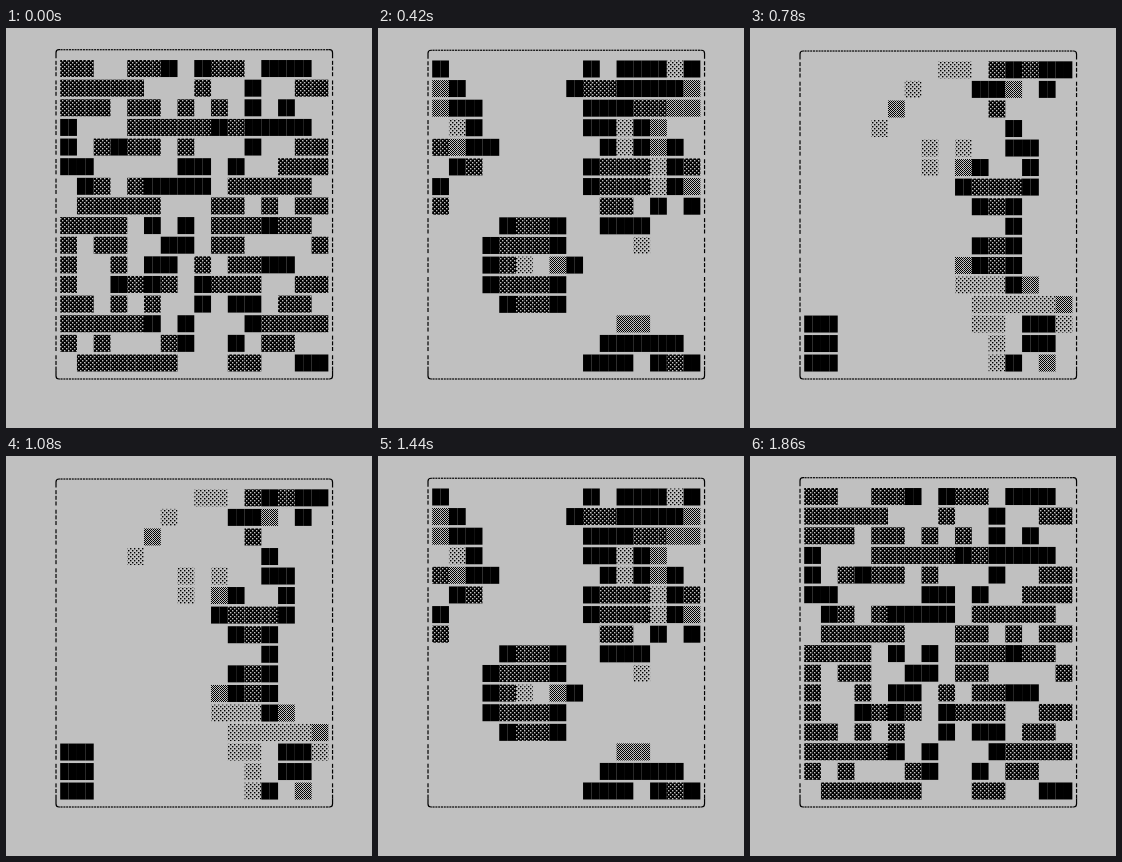
Write an HTML page with a canvas that moves like this. It is 366 px wide and 400 px high and loops after 1.89 s.

```html
<!DOCTYPE html>
<html lang="en">
<head>
<meta charset="utf-8">
<title>Game of Life with fading trails</title>
<style>
html, body { margin: 0; width: 100%; height: 100%; overflow: hidden; background: #c0c0c0; }
canvas { display: block; }
</style>
</head>
<body>
<canvas id="stage" width="366" height="400"></canvas>
<script>
const PAPER = '#c0c0c0', INK = '#000';
const N = 16, GENERATIONS = 32, STEP = 30;
const CHAR = 8.38, LEFT = 54.2, BLOCK = 17, FLOOR = 344.8, BOTTOM = 351;
const BAR_L = LEFT - CHAR / 2, BAR_R = LEFT + CHAR * (2 * N + 0.5);

// '#' is alive, '+' has just died
const SEED = [
  '++..+++#.#++.###'.replace('+++#.#', '++#.#'),
  '+++++...+..#..++',
  '+++.++.+.+.#.#..',
  '#...+++++#+####.',
  '#.+#++.+...#..++',
  '##.....##.#..+++',
  '.#+.+####.+++++.',
  '.+++++...++.+.++',
  '++++.#.#.+++#++.',
  '+.++..##.++....+',
  '+..+.##.+.++##..',
  '+..#+#+.#+++..++',
  '++.+.+..#.##.++.',
  '+++++#.#...#++++',
  '+.+...+#..#.++..',
  '.++++++...++..##'
];
SEED[0] = '++..++#.#++.###.';

const ctx = document.getElementById('stage').getContext('2d');

// A cell holds its age since death: 0 alive, 1 to 3 fading, 4 gone.
function evolve(grid) {
  const alive = (r, c) => grid[(r + N) % N][(c + N) % N] === 0;
  return grid.map((row, r) => row.map((age, c) => {
    let sum = 0;
    for (let dr = -1; dr < 2; dr++)
      for (let dc = -1; dc < 2; dc++) sum += alive(r + dr, c + dc);
    return sum === 3 || (sum === 4 && age === 0) ? 0 : Math.min(age + 1, 4);
  }));
}

const generations = [SEED.map(row => [...row].map(ch => ({ '#': 0, '+': 1 })[ch] ?? 4))];
while (generations.length < GENERATIONS) generations.push(evolve(generations.at(-1)));

// Shade made of staggered dots
function shade(back, front, size, period) {
  const tile = document.createElement('canvas');
  tile.width = tile.height = period;
  const g = tile.getContext('2d');
  g.fillStyle = back;
  g.fillRect(0, 0, period, period);
  g.fillStyle = front;
  g.fillRect(0, 0, size, size);
  g.fillRect(period / 2, period / 2, size, size);
  return ctx.createPattern(tile, 'repeat');
}
const FILLS = [INK, shade(INK, PAPER, 1.4, 4), shade(PAPER, INK, 1, 2), shade(PAPER, INK, 1.4, 4)];

// Lines holding block characters are taller than blank ones.
function lineHeight(row) {
  if (row.every(age => age > 3)) return 17;
  return row.includes(1) ? 19.63 : 19.5;
}

function drawRow(row, middle) {
  const top = middle - BLOCK / 2;
  row.forEach((age, c) => {
    if (age > 3) return;
    ctx.fillStyle = FILLS[age];
    for (let half = 0; half < 2; half++)
      ctx.fillRect(LEFT + (2 * c + half) * CHAR, top, CHAR, BLOCK);
  });
  ctx.fillStyle = INK;
  for (let i = 0; i < 3; i++)
    for (const x of [BAR_L, BAR_R])
      ctx.fillRect(x - 0.6, top + 0.8 + i * BLOCK / 3, 1.2, 4);
}

// Dashed edge with a rounded corner at each end; dir points into the box
function drawEdge(y, dir) {
  ctx.fillStyle = ctx.strokeStyle = INK;
  ctx.lineWidth = 1.2;
  for (let i = 0; i < 6 * N; i++)
    ctx.fillRect(LEFT + i * CHAR / 3 + 0.4, y - 0.6, 2, 1.2);
  for (const [x, side] of [[BAR_L, 1], [BAR_R, -1]]) {
    ctx.beginPath();
    ctx.moveTo(x, y + dir * 8.5);
    ctx.lineTo(x, y + dir * 3);
    ctx.quadraticCurveTo(x, y, x + side * 3, y);
    ctx.lineTo(x + side * CHAR / 2, y);
    ctx.stroke();
  }
}

function draw() {
  const tick = Math.floor(performance.now() / STEP) % (2 * GENERATIONS - 1);
  const grid = generations[Math.min(tick, 2 * GENERATIONS - 2 - tick)];
  ctx.fillStyle = PAPER;
  ctx.fillRect(0, 0, 366, 400);
  let y = FLOOR;
  for (let r = N - 1; r >= 0; r--) {
    const height = lineHeight(grid[r]);
    drawRow(grid[r], y - height / 2);
    y -= height;
  }
  drawEdge(y - 9, 1);
  drawEdge(BOTTOM, -1);
  requestAnimationFrame(draw);
}
draw();
</script>
</body>
</html>
```
